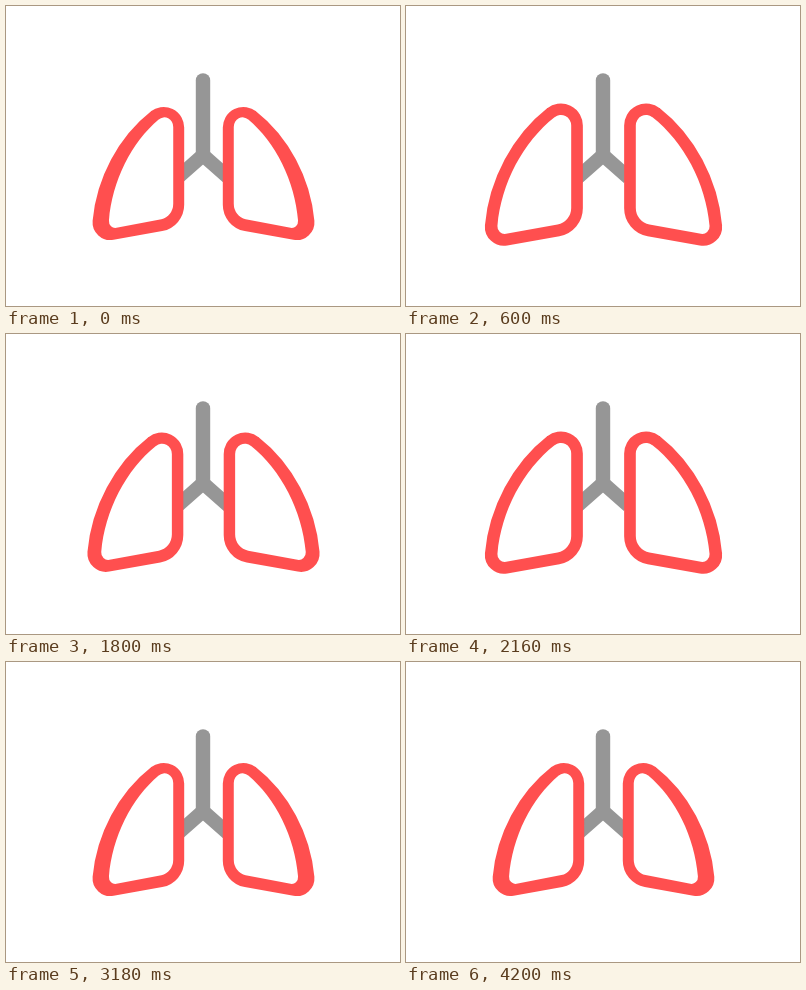
Recreate the animation shown at these times as an HTML page with a canvas. Size 394 px wide and 300 px high, loop 4.47 s.

```html
<!DOCTYPE html>
<html lang="en">
<head>
<meta charset="utf-8">
<title>Breathing lungs</title>
<style>
  html, body { margin: 0; width: 100%; height: 100%; overflow: hidden; background: #fff; }
  canvas { display: block; width: 394px; height: 300px; }
</style>
</head>
<body>
<canvas id="stage"></canvas>
<script>
const W = 394, H = 300, STEM = 197, MID = 197.5;
const LOOP = 4470, BREATH = 1000, STARTS = [-30, 1530, 3150];
const RED = '#ff4f4f', GREY = '#969696', WHITE = '#fff';
const WALL = 11.8;

const canvas = document.getElementById('stage');
const ctx = canvas.getContext('2d');
const dpr = window.devicePixelRatio || 1;
canvas.width = W * dpr;
canvas.height = H * dpr;

// Cavity of the left lung at full breath
const cavity = new Path2D();
const right = 164.8, left = 88.4, base = 230.7;
cavity.moveTo(right, 160);
cavity.arcTo(right, 217, left, base, 17);
cavity.arcTo(left, base, 89.3, 220, 7.5);
cavity.bezierCurveTo(93, 178, 115.5, 136, 148, 110.7);
cavity.arcTo(right, 97.5, right, 160, 10.5);
cavity.closePath();

// Scale about (x, y), from (sx, sy) at rest to 1 at full breath
function inflate(k, x, y, sx, sy, paint) {
  const grow = s => s + (1 - s) * k;
  ctx.save();
  ctx.translate(x, y);
  ctx.scale(grow(sx), grow(sy));
  ctx.translate(-x, -y);
  paint();
  ctx.restore();
}

function lung(k) {
  inflate(k, MID, 151, 0.923, 0.923, () => {
    ctx.fillStyle = ctx.strokeStyle = RED;
    ctx.lineWidth = 2 * WALL;
    ctx.fill(cavity);
    ctx.stroke(cavity);
  });
  // The cavity shrinks more than the wall around it
  inflate(k, 181, 142, 0.849, 0.917, () => {
    ctx.fillStyle = WHITE;
    ctx.fill(cavity);
  });
}

function line(width, cap, ...points) {
  ctx.strokeStyle = GREY;
  ctx.lineWidth = width;
  ctx.lineCap = cap;
  ctx.beginPath();
  points.forEach(([x, y]) => ctx.lineTo(STEM + x, y));
  ctx.stroke();
}

function windpipe() {
  line(14.4, 'round', [0, 74.4], [0, 148]);
  line(14, 'butt', [-25.5, 171.7], [0, 149.2], [25.5, 171.7]);
}

function breath(t) {
  const start = STARTS.findLast(s => s <= t);
  const q = Math.min((t - start) / BREATH, 1);
  return Math.sin(Math.PI * q) ** 2;
}

function draw(t) {
  const k = breath(t % LOOP);
  ctx.setTransform(dpr, 0, 0, dpr, 0, 0);
  ctx.fillStyle = WHITE;
  ctx.fillRect(0, 0, W, H);
  windpipe();
  lung(k);
  ctx.translate(2 * MID, 0);
  ctx.scale(-1, 1);
  lung(k);
}

const t0 = performance.now();
function tick() {
  draw(performance.now() - t0);
  requestAnimationFrame(tick);
}
tick();
</script>
</body>
</html>
```
